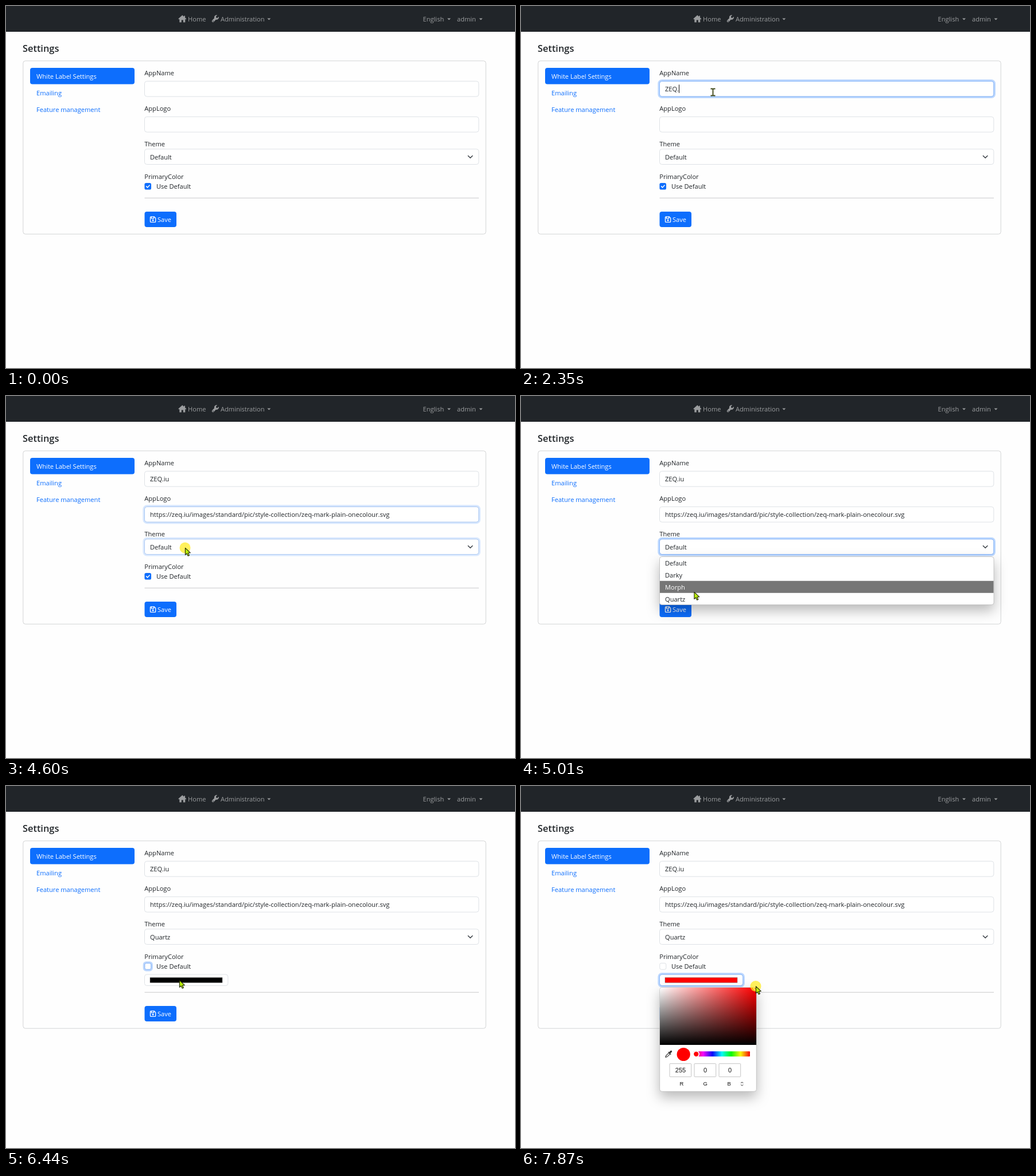
An HTML page for the animation above (8000 ms loop, 887 by 632 pixels).

```html
<!DOCTYPE html>
<html lang="en">
<head>
<meta charset="utf-8">
<title>Settings form</title>
<style>
  html, body { margin: 0; width: 100%; height: 100%; overflow: hidden; background: #fefefe; }
  svg { display: block; width: 100%; height: 100%; }
  text { font: 11.1px "Open Sans", "Noto Sans", sans-serif; fill: #212529; white-space: pre; }
  .nav text { fill: #9b9d9f; }
  .nav path { fill: #9b9d9f; }
  .title { font-size: 16.4px; font-weight: 600; }
  .link { fill: #0d6efd; }
  .light { fill: #fff; }
  .box { fill: #fff; stroke: #dee2e6; }
  .ring { fill: none; stroke: #0d6efd; stroke-opacity: .27; stroke-width: 3; }
  .edge { fill: none; stroke: #86b7fe; }
  .popup { filter: drop-shadow(0 10px 11px rgba(0, 0, 0, .27)); }
  .num text { font: 11px "Liberation Sans", Arial, sans-serif; text-anchor: middle; fill: #111; }
  .num .small { font-size: 9.5px; }
</style>
</head>
<body>
<svg viewBox="0 0 887 632">
  <defs>
    <linearGradient id="sat"><stop stop-color="#fff"/><stop offset="1" stop-color="#f00"/></linearGradient>
    <linearGradient id="val" x2="0" y2="1"><stop stop-opacity="0"/><stop offset="1"/></linearGradient>
    <linearGradient id="hue"></linearGradient>
    <clipPath id="area"><path d="M242 452V356q0-4 4-4H406q4 0 4 4V452Z"/></clipPath>
  </defs>

  <rect width="887" height="632" fill="#fefefe"/>
  <g class="nav">
    <rect width="887" height="45" fill="#212529"/>
    <path d="M307.3 16 300.3 22.3 301.3 23.5 302.3 22.7V28.5H305.8V24.5H308.8V28.5H312.3V22.7L313.3 23.5 314.3 22.3 312 20.2V17H310.3V18.7Z"/>
    <path d="M370.7 18.6 368.4 20.9 366.3 20.4 365.8 18.3 368.1 16C365 15.2 362.2 18 363 21.2L359.3 25C357.7 27.2 360.1 29.3 362 27.7L365.8 23.8C369 24.6 371.7 21.7 370.7 18.6Z"/>
    <circle cx="361" cy="26.4" r=".8" fill="#212529"/>
    <text x="317" y="27">Home</text>
    <text x="374" y="27">Administration</text>
    <text x="726.5" y="27">English</text>
    <text x="786" y="27">admin</text>
    <path d="M455.3 21.5h6l-3 3ZM769 21.5h6l-3 3ZM824.5 21.5h6l-3 3Z"/>
  </g>

  <text class="title" x="29" y="80">Settings</text>
  <rect id="card" x="29.8" y="95.8" width="806.4" height="302.4" rx="4" fill="#fefefe" stroke="#d3d4d5"/>
  <rect x="42" y="108" width="182" height="28.5" rx="4" fill="#0d6efd"/>
  <text class="light" x="53" y="126.5">White Label Settings</text>
  <text class="link" x="53" y="155.5">Emailing</text>
  <text class="link" x="53" y="184.5">Feature management</text>

  <text x="241.3" y="121">AppName</text>
  <text x="241.3" y="183">AppLogo</text>
  <text x="241.3" y="245">Theme</text>
  <text x="241.3" y="301.5">PrimaryColor</text>
  <text x="262" y="319">Use Default</text>
  <g id="fields"></g>
  <text id="name" x="251" y="149"></text>
  <text id="logo" x="251" y="211"></text>
  <text id="theme" x="251" y="267.5"></text>
  <rect id="caret" width="1" height="14.5" fill="#111"/>
  <path d="M805.3 261.5l3.8 3.7 3.8-3.7" fill="none" stroke="#343a40" stroke-width="1.4" stroke-linecap="round"/>
  <g id="checked">
    <rect x="241.5" y="309" width="11.5" height="11.5" rx="2.6" fill="#0d6efd"/>
    <path d="M244.6 314.9l2 2 3.5-3.9" fill="none" stroke="#fff" stroke-width="1.5" stroke-linecap="round"/>
  </g>
  <rect id="swatch" x="251" y="334.3" width="126" height="9" stroke="#777" stroke-width=".5"/>

  <g id="footer">
    <path d="M241.5 335.2H824" stroke="#c8c9ca"/>
    <rect x="241.5" y="359" width="55.5" height="27" rx="4" fill="#0d6efd"/>
    <path d="M251.5 369q0-1.2 1.2-1.2H258.2L260.7 370.3V376.2q0 1.2-1.2 1.2H252.7q-1.2 0-1.2-1.2ZM253.4 368v2.8h4.2V368" fill="none" stroke="#fff" stroke-width="1.3"/>
    <circle cx="256.1" cy="374" r="1.5" fill="#fff"/>
    <text class="light" x="264" y="377">Save</text>
  </g>

  <g id="menu">
    <rect class="popup" x="241.5" y="280.5" width="582.5" height="84" rx="4" fill="#fff" stroke="#b9b9b9" stroke-width=".8"/>
    <rect id="hover" x="242" width="581.5" height="21" fill="#767676"/>
    <g id="options"></g>
  </g>

  <g id="picker">
    <rect class="popup" x="241.7" y="351.7" width="168.6" height="181.6" rx="4" fill="#fff" stroke="#b5b5b5" stroke-width=".7"/>
    <g clip-path="url(#area)">
      <rect x="242" y="352" width="168" height="100" fill="url(#sat)"/>
      <rect x="242" y="352" width="168" height="100" fill="url(#val)"/>
      <circle id="handle" r="4.5" fill="none" stroke="#fff" stroke-width="1.8"/>
    </g>
    <path d="M252 473.5l.7-2.7 5-5 2 2-5 5ZM257 464.7l3.8 3.8M258.8 466.3l2.6-2.7" fill="none" stroke="#333" stroke-width="1.2" stroke-linecap="round"/>
    <path d="M259.4 465.6l2.2-2.2" stroke="#333" stroke-width="3" stroke-linecap="round"/>
    <circle id="preview" cx="283.2" cy="468.5" r="11.6"/>
    <rect x="301" y="463.3" width="98" height="9" rx="1" fill="url(#hue)"/>
    <circle cx="305.3" cy="468" r="5" fill="#f00" stroke="#fff" stroke-width="1.7"/>
    <g class="num" id="numbers"></g>
    <path d="M383.2 519l2-2.2 2 2.2M383.2 521.2l2 2.2 2-2.2" fill="none" stroke="#333"/>
  </g>

  <g id="pointer">
    <circle id="press" r="9.5" fill="#ffec1f" opacity=".72"/>
    <path id="arrow" d="M.4.4V12.4L3.1 10 5.2 14.3 7.4 13.2 5.3 9.1 9.2 8.7Z" fill="#b9ee0a" stroke="#22260c" stroke-width="1.1" stroke-linejoin="round"/>
    <path id="beam" d="M-4-5.5H-1L0-4.5 1-5.5H4M-4 6.5H-1L0 5.5 1 6.5H4M0-4.5V5.5" fill="none" stroke="#414a1c" stroke-width="1.9"/>
  </g>
</svg>

<script>
const LOOP = 8000;
const NAME = "ZEQ.iu";
const LOGO = "https://zeq.iu/images/standard/pic/style-collection/zeq-mark-plain-onecolour.svg";
const KEY_TIMES = [1680, 1940, 2080, 2350, 2610, 2810];
const PASTE = 3950, MENU_OPEN = 4610, MENU_PICK = 5360, UNCHECK = 6160, PICKER_OPEN = 6570, DRAG = 7200;
const THEMES = ["Default", "Darky", "Morph", "Quartz"];

// x, y, width, height, time of focus and of blur
const FIELDS = {
  name: [241.5, 131.3, 582.3, 26.7, 1020, 3480],
  logo: [241.5, 193.4, 582.3, 26.7, 3480, 4540],
  select: [241.5, 249.8, 582.3, 26.7, 4540, UNCHECK],
  check: [241.8, 309.3, 11, 11, UNCHECK, 6500],
  color: [241.5, 329, 145.3, 19.5, 6500, Infinity]
};

// time, x, y of the hot spot
const PATH = [
  [260, 810, 612], [820, 334.5, 150], [3340, 334.5, 150], [3810, 356, 158.8],
  [4140, 356, 158.8], [4480, 312, 265], [4640, 312, 265], [5010, 301.5, 342],
  [5200, 297, 354], [5390, 297, 354], [5750, 275, 314], [5960, 275, 314],
  [6110, 247, 314.5], [6230, 247, 314.5], [6430, 302, 339], [6780, 302, 339],
  [6990, 319, 378.5], [7200, 340, 376], [7540, 380, 362], [7870, 409, 349.5]
];
const PRESSES = [[1020, 1170], [4540, 4660], [5290, 5400], [6160, 6270], [6500, 6610], [DRAG, LOOP]];

const $ = id => document.getElementById(id);
const clamp = v => Math.max(0, Math.min(1, v));
const show = (id, on) => $(id).setAttribute("visibility", on ? "visible" : "hidden");
const move = (id, x, y) => $(id).setAttribute("transform", `translate(${x} ${y})`);
const write = (id, text) => { if ($(id).textContent !== text) $(id).textContent = text; };

function add(parent, tag, attrs, text = "") {
  const el = document.createElementNS("http://www.w3.org/2000/svg", tag);
  for (const key in attrs) el.setAttribute(key, attrs[key]);
  el.textContent = text;
  return $(parent).appendChild(el);
}

for (const [key, [x, y, width, height]] of Object.entries(FIELDS)) {
  const rx = key === "check" ? 2.6 : 4;
  add("fields", "g", { id: key + "Box" });
  add(key + "Box", "rect", { class: "box", x, y, width, height, rx });
  add(key + "Box", "g", { id: key + "Focus" });
  add(key + "Focus", "rect", { class: "ring", x: x - 1.6, y: y - 1.6, width: width + 3.2, height: height + 3.2, rx: rx + 1.6 });
  add(key + "Focus", "rect", { class: "edge", x, y, width, height, rx });
}
const optionTexts = THEMES.map((theme, i) => add("options", "text", { x: 251, y: 296 + 21 * i }, theme));
["red", "green", "blue"].forEach((channel, i) => {
  const x = 259 + 43 * i;
  add("numbers", "rect", { x, y: 484.7, width: 37.7, height: 23, rx: 1, fill: "#fff", stroke: "#c4c4c4" });
  add("numbers", "text", { id: channel, x: x + 19, y: 500 });
  add("numbers", "text", { class: "small", x: 280 + 41.3 * i, y: 523 }, "RGB"[i]);
});
for (let i = 0; i <= 6; i++) {
  add("hue", "stop", { offset: i / 6, "stop-color": `hsl(${360 - 60 * i} 95% 50%)` });
}

function pointerAt(t) {
  const next = PATH.findIndex(point => point[0] > t);
  if (next < 0) return PATH[PATH.length - 1].slice(1);
  if (next === 0) return PATH[0].slice(1);
  const [t0, x0, y0] = PATH[next - 1], [t1, x1, y1] = PATH[next];
  const u = (t - t0) / (t1 - t0), k = u * u * (3 - 2 * u);
  return [x0 + (x1 - x0) * k, y0 + (y1 - y0) * k];
}

function drawCaret(t) {
  const inName = t < FIELDS.logo[4];
  const blink = (t >= 1610 && t < 1680) || (t >= 3340 && t < 3480);
  const end = $(inName ? "name" : "logo").getComputedTextLength();
  $("caret").setAttribute("x", Math.round(251 + end));
  $("caret").setAttribute("y", inName ? 137.3 : 199.4);
  show("caret", t >= 1020 && t < 4540 && !blink);
}

function drawPicker(t, x, y) {
  const dragging = t >= DRAG;
  const s = dragging ? clamp((x - 242) / 167) : 0;
  const v = dragging ? clamp(1 - (y - 352) / 100) : 0;
  const red = Math.round(255 * v), rest = Math.round(255 * v * (1 - s));
  const color = `rgb(${red},${rest},${rest})`;
  $("swatch").setAttribute("fill", color);
  $("preview").setAttribute("fill", color);
  write("red", String(red));
  write("green", String(rest));
  write("blue", String(rest));
  move("handle", 242 + 168 * s, 452 - 100 * v);
  show("picker", t >= PICKER_OPEN);
}

function drawMenu(t, y) {
  const open = t >= MENU_OPEN && t < MENU_PICK;
  const row = Math.max(0, Math.min(3, Math.floor((y - 280.5) / 21)));
  show("menu", open);
  $("hover").setAttribute("y", 280.8 + 21 * row);
  optionTexts.forEach((el, i) => el.setAttribute("class", i === row ? "light" : ""));
  write("theme", THEMES[t < MENU_PICK ? 0 : 3]);
}

function draw(t) {
  const [x, y] = pointerAt(t);
  for (const key in FIELDS) {
    const [, , , , on, off] = FIELDS[key];
    $(key + "Focus").setAttribute("opacity", clamp((t - on + 20) / 150) - clamp((t - off) / 150));
  }
  write("name", NAME.slice(0, KEY_TIMES.filter(time => time <= t).length));
  write("logo", t >= PASTE ? LOGO : "");
  drawCaret(t);
  drawMenu(t, y);
  drawPicker(t, x, y);

  const custom = t >= UNCHECK;
  show("checked", !custom);
  show("colorBox", custom);
  show("swatch", custom);
  move("footer", 0, custom ? 25 : 0);
  $("card").setAttribute("height", custom ? 327.4 : 302.4);

  const overText = x > 241 && x < 824 && ((y > 131 && y < 158) || (y > 193 && y < 220));
  const visible = t >= 260;
  move("pointer", x, y);
  show("arrow", visible && !overText);
  show("beam", visible && overText);
  show("press", PRESSES.some(([from, to]) => t >= from && t < to));
}

function tick() {
  draw(performance.now() % LOOP);
  requestAnimationFrame(tick);
}
tick();
</script>
</body>
</html>
```
